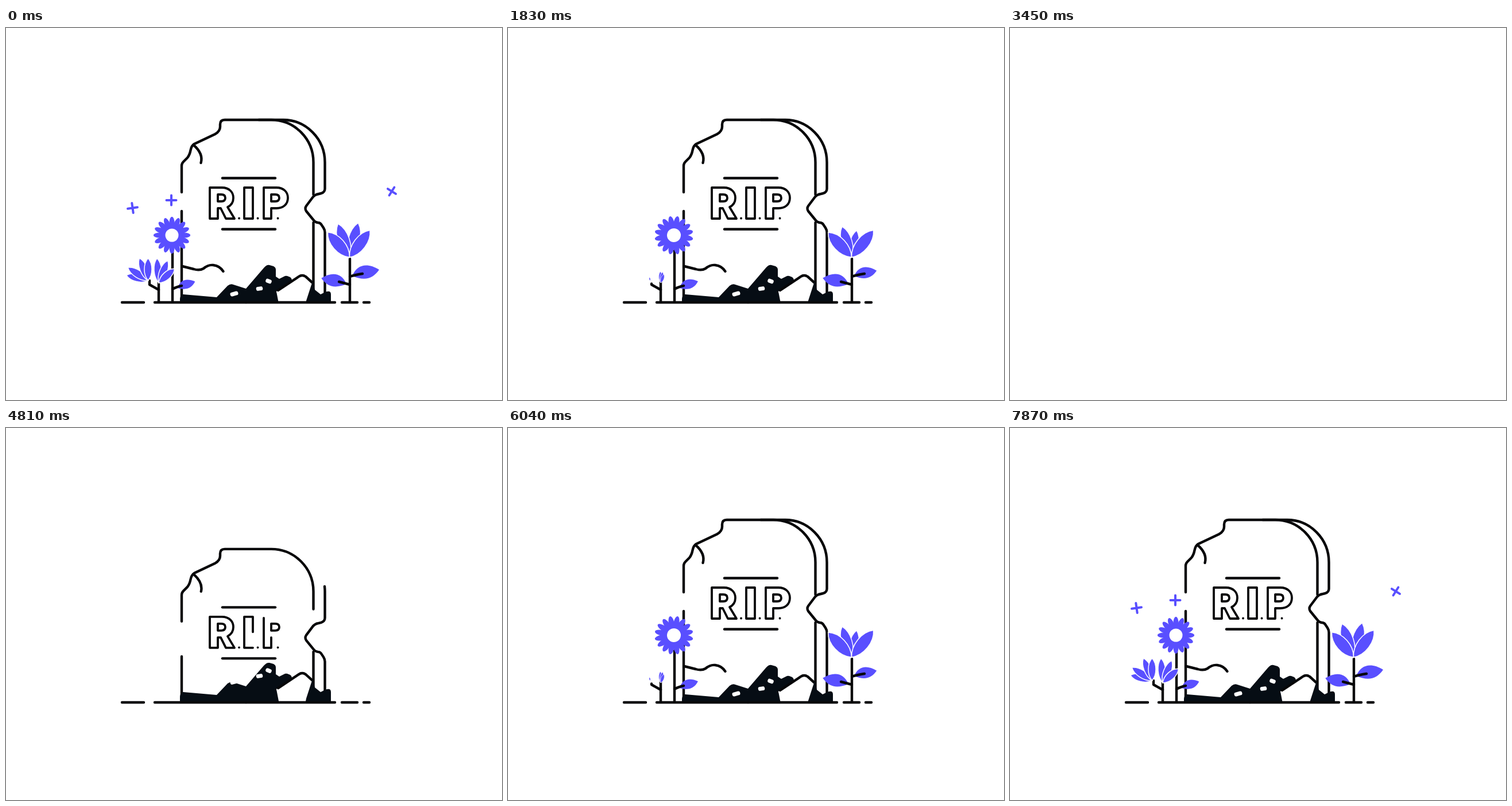
Recreate the animation shown at these times as an HTML page. Size 864 by 648 pixels, loop 7900 ms.

```html
<!DOCTYPE html>
<html lang="en">
<head>
<meta charset="utf-8">
<title>Gravestone</title>
<style>
  html, body { margin: 0; width: 100%; height: 100%; overflow: hidden; background: #fff; }
  svg { display: block; width: 100vw; height: 100vh; }
  .line { fill: none; stroke: #060608; stroke-width: 4.4; stroke-linecap: round; stroke-linejoin: round; }
  .letter { stroke-width: 3.8; }
  .rock { fill: #060d14; }
  .white { fill: #fff; }
  .bloom { fill: #594fff; }
  .petal { stroke: #fff; stroke-width: 1.5; }
  .plus { fill: none; stroke: #594fff; stroke-width: 4; stroke-linecap: round; }
</style>
</head>
<body>
<svg viewBox="0 0 864 648">
  <defs><clipPath id="above"><rect width="864" height="478"/></clipPath></defs>

  <!-- data-draw: start and end of the stroke reveal, in ms of build time -->
  <g clip-path="url(#above)">
    <g id="stone">
      <path class="line" data-draw="80 410" d="M306 286V240Q306 236 309 233L316 226Q320 221 321.500 213Q323 205 328 202L364 185Q373 180 373 172V168Q373 160 381 160H462A73.500 74 0 0 1 535.500 234V290"/>
      <path class="line" data-draw="150 440" d="M306 482V319"/>
      <path class="line" data-draw="285 600" d="M541 290L549 288Q555.500 286 555.500 280V234A73 74 0 0 0 483 160H440"/>
      <path class="line" data-draw="60 300" d="M555.500 472V356Q555.500 352 553 348L549 342Q547 339 543 339Q538 338 536 335L523 319Q520 314.500 523 310L535 294Q538 291 541 290"/>
      <path class="line" data-draw="60 300" d="M535.500 472V339"/>
      <path class="line" data-draw="250 395" d="M327 204Q344 219 339.500 235"/>
      <path class="line" data-draw="400 520" d="M307 415L327 420Q337 423 344 419Q352 412 361 413Q372 414 378.500 424"/>
      <path class="line" data-draw="180 380" d="M377 261.500H469"/>
      <path class="line" data-draw="180 380" d="M377 350.500H469"/>
      <path class="line letter" data-draw="110 360" d="M369 314V332H355V278H376C389 278 396 286 396 296C396 304 392 309 386 312L398 332H383L374 314Z"/>
      <path class="line letter" data-draw="110 360" d="M369 290H375Q382 290 382 296T375 302H369Z"/>
      <path class="line letter" data-draw="190 440" d="M430 332H415V278H430Z"/>
      <path class="line letter" data-draw="270 525" d="M462 314V332H449V278H471C484 278 491 286 491 296C491 307 483 314 471 314Z"/>
      <path class="line letter" data-draw="150 380" d="M462 290H469Q476 290 476 296T469 302H462Z"/>
      <path class="line letter" data-draw="200 210" d="M406 331.500h.1M438.500 331.500h.1M473.500 331.500h.1"/>
    </g>
    <g id="rubble">
      <path class="rock" d="M303 490V472Q304 463 309 464L367 469L386 449Q391 445 396 447L418 454L449 418Q454 412 459 413L466 415Q470 417 470 421V433L476 437L484 433Q487 431 490 432L495 434Q498 436 498 440L471 459L477 490Z"/>
      <path class="white" d="M471 459L510 433Q516 429 522 433L534 443L523 476H477Z"/>
      <path class="line" d="M474 457L510 433Q516 429 522 433L533 443"/>
      <path class="rock" d="M534 441L538 456L548 464L556 460Q566 456 566 464V490H520L523 475Z"/>
      <g id="pebbles"></g>
    </g>
  </g>

  <path class="line" data-draw="0 230" d="M418 478H573"/>
  <path class="line" data-draw="0 230" d="M418 478H259"/>
  <path class="line" data-draw="0 230" d="M240 478H202"/>
  <path class="line" data-draw="0 230" d="M585 478H612"/>
  <path class="line" data-draw="0 230" d="M623 478H633"/>

  <path class="line" data-draw="820 1120" d="M290 476V388"/>
  <path class="line" data-draw="900 1200" d="M599 476V402"/>
  <path class="line" data-draw="1200 1500" d="M266 476V442"/>
  <path class="line" data-draw="1400 1680" d="M266 456L250 447V440"/>
  <g id="plants"></g>
  <path class="line" data-draw="1080 1280" d="M599 447L580 442"/>
  <path class="line" data-draw="1200 1450" d="M599 433Q608 430 621 428"/>
  <path class="line" data-draw="1100 1350" d="M290 455Q296 451 306 449"/>
  <g id="sparks"></g>
</svg>
<script>
const LOOP = 7900, BUILD = 3450, STEP = 30;
const $ = id => document.getElementById(id);
const clamp = x => Math.min(1, Math.max(0, x));
const progress = (u, start, end) => clamp((u - start) / (end - start));
const backOut = x => x <= 0 ? 0 : 1 + 2.2 * (x - 1) ** 3 + 1.2 * (x - 1) ** 2;
const pop = (u, start, length) => backOut(progress(u, start, start + length));

function add(parent, tag, attributes) {
  const node = document.createElementNS('http://www.w3.org/2000/svg', tag);
  for (const key in attributes) node.setAttribute(key, attributes[key]);
  return parent.appendChild(node);
}

function place(node, x, y, angle, scaleX, scaleY = scaleX) {
  node.style.display = scaleX ? '' : 'none';
  node.setAttribute('transform', `translate(${x} ${y}) rotate(${angle}) scale(${scaleX} ${scaleY})`);
}

const updates = [];

for (const path of document.querySelectorAll('[data-draw]')) {
  const [start, end] = path.dataset.draw.split(' ').map(Number);
  path.setAttribute('pathLength', 1);
  updates.push(u => {
    const p = progress(u, start, end);
    path.style.display = p ? '' : 'none';
    path.style.strokeDasharray = p < 1 ? `${p} 2` : 'none';
  });
}

function addPebble(x, y, width, angle, hop, start) {
  const bar = add($('pebbles'), 'rect', { class: 'white', x: -width / 2, y: -3.5, width, height: 7, rx: 3 });
  updates.push(u => place(bar, x, y - hop * Math.sin(Math.PI * progress(u, start, start + 450)), angle, 1));
}
addPebble(397.5, 463, 14, -15, 26, 290);
addPebble(441.5, 454, 11.5, -8, 19, 210);
addPebble(457.5, 441, 10.5, 22, 19, 265);

function addLeaf(x, y, angle, size, flip, start) {
  const leaf = add($('plants'), 'path', { class: 'bloom', d: 'M0 0C8 -20 26 -24 47 -11C36 5 22 9 0 0Z' });
  updates.push(u => {
    const s = size * pop(u, start, 500);
    place(leaf, x, y, angle, s * flip, s);
  });
}
addLeaf(603, 432, 0, 1, 1, 1470);
addLeaf(593, 446, 0, 0.93, -1, 1200);
addLeaf(299, 453, -7, 0.67, 1, 1290);

// Each petal: angle, length, half width, start time
function addBlossom(x, y, petals) {
  for (const [angle, length, width, start] of petals) {
    const w = width * 1.34;
    const petal = add($('plants'), 'path', {
      class: 'bloom petal',
      d: `M0 0C${-w} ${-length * 0.27} ${-w} ${-length * 0.75} 0 ${-length}C${w} ${-length * 0.75} ${w} ${-length * 0.27} 0 0Z`
    });
    updates.push(u => {
      const p = pop(u, start, 500);
      place(petal, x, y, angle * p, Math.min(p, 1.03));
    });
  }
}
addBlossom(598.5, 399.5, [
  [14, 62, 10, 1490], [-19, 62, 10, 1445], [-41, 58, 10.5, 1290], [37, 59, 10.5, 1290]
]);
addBlossom(266, 444, [
  [-4, 43, 6.5, 1555], [22, 42, 6.5, 1555], [48, 37, 6.5, 1560]
]);
addBlossom(247.5, 440, [
  [-76, 39, 6.5, 1602], [-57, 42, 6.5, 1618], [-21, 42, 6.5, 1620], [0, 39, 6.5, 1620]
]);

const sunflower = add($('plants'), 'g', { class: 'bloom' });
for (let i = 0; i < 16; i++)
  add(sunflower, 'ellipse', { cy: -21, rx: 4.6, ry: 11.2, transform: `rotate(${i * 22.5})` });
add(sunflower, 'circle', { r: 19 });
add(sunflower, 'circle', { r: 11.5, class: 'white' });
updates.push(u => place(sunflower, 289, 361, (u - BUILD) * 0.01844, pop(u, 1150, 650)));

function addSpark(x, y, start, fade = Infinity) {
  const plus = add($('sparks'), 'path', { class: 'plus', d: 'M-8.500 0H8.500M0 -8.500V8.500' });
  updates.push(u => {
    const shrink = clamp((u - fade) / 120);
    const turn = -100 * (1 - progress(u, start, start + 500));
    place(plus, x, y, turn, pop(u, start, 500) * (1 - shrink));
  });
}
addSpark(288, 300, 2150);
addSpark(220.5, 313.5, 2990);
addSpark(703, 345, 2380, 3300);
addSpark(672, 284.5, 3240);

updates.push(u => {
  const rise = progress(u, 30, 515);
  const settle = (1 - Math.cos(Math.PI * progress(u, 530, 880))) / 2;
  const lift = 325 - 330 * (rise + Math.sin(rise * Math.PI / 2)) / 2 + 5 * settle;
  $('stone').setAttribute('transform', `translate(0 ${lift})`);
  $('rubble').setAttribute('transform', `translate(0 ${75 * (1 - pop(u, 60, 540))})`);
});

// The scene is taken apart, pauses empty, then is built up again.
function buildTime(t) {
  if (t < BUILD) return BUILD - Math.floor(t / STEP) * STEP;
  return Math.max(0, Math.floor((t - (LOOP - BUILD - STEP)) / STEP) * STEP);
}

function render() {
  const u = buildTime(performance.now() % LOOP);
  for (const update of updates) update(u);
  requestAnimationFrame(render);
}
render();
</script>
</body>
</html>
```
